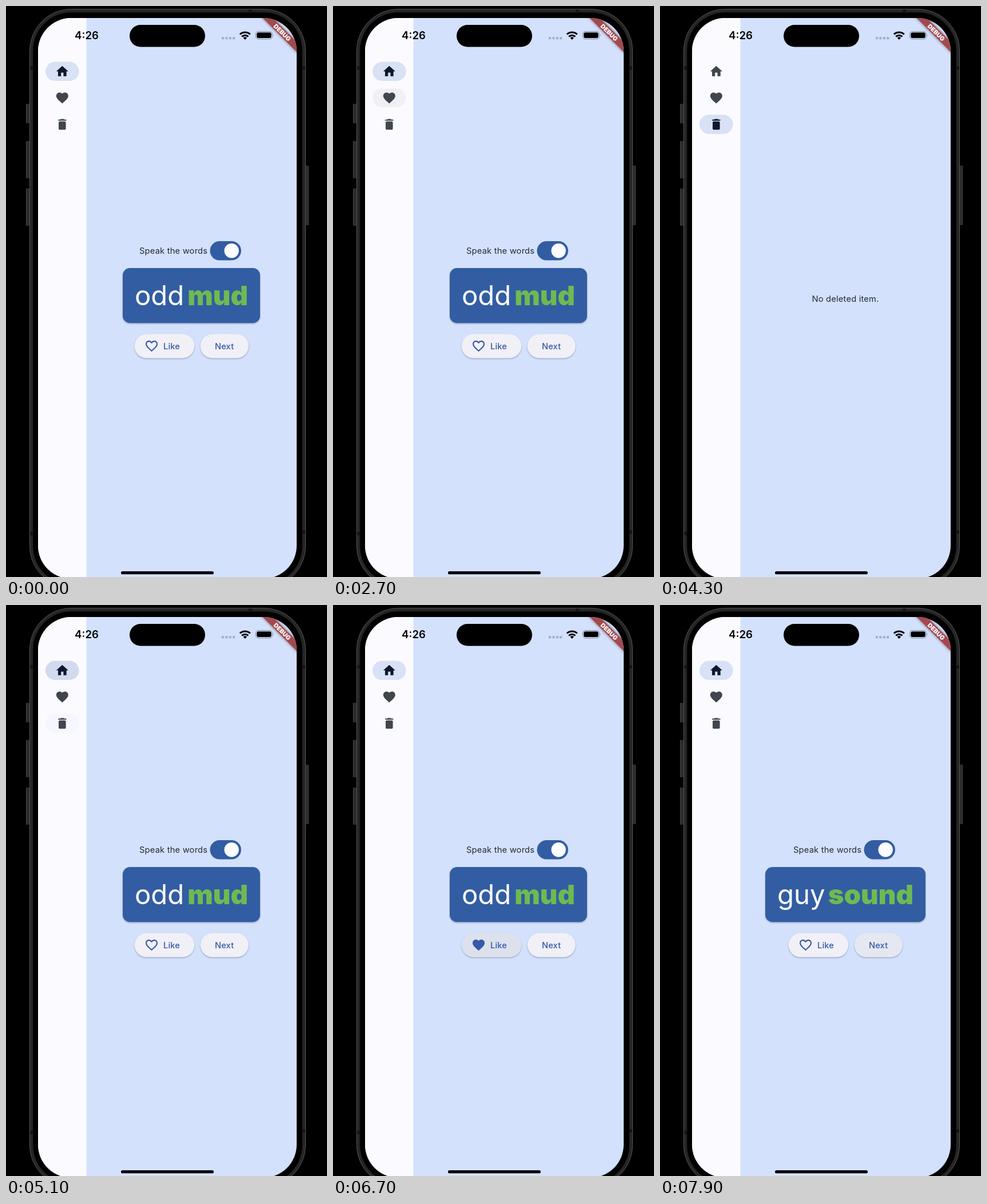
These frames come from a looping animation (561x998 px, 8 s). An HTML page:

```html
<!DOCTYPE html>
<html lang="en">
<head>
<meta charset="utf-8">
<title>Word pair app</title>
<style>
  html, body { margin: 0; height: 100%; overflow: hidden; background: #000; }
  svg { display: block; width: 100vw; height: 100vh; font-family: Inter, Roboto, sans-serif; }
  .body { font-size: 14.7px; letter-spacing: .2px; fill: #262a31; text-anchor: middle; }
  .label { font-size: 14.7px; font-weight: 500; letter-spacing: .1px; fill: #3759a8; }
  .big { font-size: 47.3px; }
  .button { fill: #f0f0f6; filter: url(#shadow); }
  .blue { fill: #325da3; }
</style>
</head>
<body>
<svg viewBox="0 0 561 998">
  <defs>
    <filter id="shadow" x="-10%" y="-20%" width="120%" height="150%">
      <feDropShadow dx="0" dy="1.3" stdDeviation="1.2" flood-color="#1b2a4a" flood-opacity=".38"/>
    </filter>
    <filter id="bannerShadow" x="-20%" y="-80%" width="140%" height="260%">
      <feDropShadow dx="0" dy="0" stdDeviation="2.6" flood-opacity=".5"/>
    </filter>
    <clipPath id="screen"><rect x="56" y="21" width="452" height="980" rx="58"/></clipPath>
    <clipPath id="wordClip"><rect id="wordArea" y="458" height="96"/></clipPath>
    <path id="home" d="M10 20v-6h4v6h5v-8h3L12 3 2 12h3v8z"/>
    <path id="heart" d="M12 21.35l-1.45-1.32C5.4 15.36 2 12.28 2 8.5 2 5.42 4.42 3 7.5 3c1.74 0 3.41.81 4.5 2.09C13.09 3.81 14.76 3 16.5 3 19.58 3 22 5.42 22 8.5c0 3.78-3.4 6.86-8.55 11.54z"/>
    <path id="heartLine" d="M16.5 3c-1.74 0-3.41.81-4.5 2.09C10.91 3.81 9.24 3 7.5 3 4.42 3 2 5.42 2 8.5c0 3.78 3.4 6.86 8.55 11.54L12 21.35l1.45-1.32C18.6 15.36 22 12.28 22 8.5 22 5.42 19.58 3 16.5 3zm-4.4 15.55l-.1.1-.1-.1C7.14 14.24 4 11.39 4 8.5 4 6.5 5.5 5 7.5 5c1.54 0 3.04.99 3.57 2.36h1.87C13.46 5.99 14.96 5 16.5 5c2 0 3.5 1.5 3.5 3.5 0 2.89-3.14 5.74-7.9 10.05z"/>
    <path id="trash" d="M6 19c0 1.1.9 2 2 2h8c1.1 0 2-.9 2-2V9c0-1.1-.9-2-2-2H8c-1.1 0-2 .9-2 2zM18 4h-2.5l-.7-.7q-.3-.3-.7-.3H9.9q-.4 0-.7.3L8.5 4H6a1 1 0 0 0 0 2h12a1 1 0 0 0 0-2z"/>
  </defs>

  <!-- Phone body -->
  <rect width="561" height="998"/>
  <path fill="#2b2b2b" d="M35 171h7v34h-7zM35 236h7v65h-7zM35 319h7v65h-7zM523 279h6v104h-6z"/>
  <path stroke="#454545" d="M35.5 171v34M35.5 236v65M35.5 319v65M528.5 279v104"/>
  <rect x="41.5" y="5.5" width="482" height="1011" rx="73" fill="#262626" stroke="#555"/>
  <rect x="47" y="11" width="471" height="1000" rx="67" stroke="#191919"/>
  <path fill="#141414" d="M42 105h5v6h-5zM518 105h5v6h-5zM42 919h5v6h-5zM518 916h5v6h-5zM424 6h6v4h-6z"/>

  <g clip-path="url(#screen)">
    <rect x="56" y="21" width="452" height="980" fill="#d3e1fc"/>
    <rect x="56" y="21" width="84.5" height="980" fill="#fbfbff"/>
    <g id="rail"></g>

    <g id="page0">
      <text class="body" x="292.6" y="433.3">Speak the words</text>
      <rect class="blue" x="356.5" y="411" width="54.5" height="33.6" rx="16.8"/>
      <circle cx="394.2" cy="427.8" r="12.7" fill="#fdfcff"/>
      <rect id="card" class="blue" y="458" height="96" rx="12.6" filter="url(#shadow)"/>
      <g clip-path="url(#wordClip)">
        <text id="first" class="big" y="522.8" fill="#fff"></text>
        <text id="second" class="big" y="522.8" font-weight="900" fill="#6fba50" text-anchor="end"></text>
      </g>
      <rect class="button" x="224.7" y="573.3" width="104.6" height="42" rx="21"/>
      <rect class="button" x="339.8" y="573.3" width="84" height="42" rx="21"/>
      <g id="buttonInk"></g>
      <use id="likeIcon" fill="#3759a8" transform="translate(241.9 581.7) scale(1.051)"/>
      <text class="label" x="275" y="599.6">Like</text>
      <text class="label" x="365" y="599.6">Next</text>
    </g>
    <text id="page1" class="body" x="324" y="516.5">No favorites yet.</text>
    <text id="page2" class="body" x="324" y="516.5">No deleted item.</text>

    <!-- Status bar -->
    <rect x="216" y="33" width="132" height="38.5" rx="19.2"/>
    <text x="141" y="58.2" font-size="18.6" font-weight="600" text-anchor="middle">4:26</text>
    <path stroke="#a5aebf" stroke-width="4" stroke-dasharray="4 2.4" d="M377 56.3h23.4"/>
    <g fill="none" stroke="#000" stroke-width="3">
      <path d="M408.8 49.5a13 13 0 0 1 18 0M412.2 53.5a8 8 0 0 1 11.2 0"/>
      <path fill="#000" stroke="none" d="M417.8 59l-3.3-3.4a4.8 4.8 0 0 1 6.6 0z"/>
    </g>
    <rect x="436.5" y="44.5" width="29" height="13.4" rx="4.4" fill="none" stroke="#7e8798"/>
    <rect x="438.3" y="46.3" width="25.4" height="9.8" rx="2.8"/>
    <path fill="#7e8798" d="M467 48.8q1.8 2.4 0 4.8z"/>

    <g transform="translate(508 21) rotate(45)">
      <rect x="-45" y="29.4" width="90" height="12.7" fill="#a34a50" filter="url(#bannerShadow)"/>
      <text y="39.7" font-size="10.7" font-weight="900" fill="#fff" text-anchor="middle">DEBUG</text>
    </g>
    <rect x="201" y="988" width="162" height="5.3" rx="2.6"/>
  </g>
</svg>

<script>
const LOOP = 8000;
const FADE = 400;
const CENTER = 324;
const $ = id => document.getElementById(id);
const clamp = v => Math.min(1, Math.max(0, v));
const progress = (t, start, length) => clamp((t - start) / length);

function add(parent, tag, attributes) {
  const node = document.createElementNS('http://www.w3.org/2000/svg', tag);
  set(node, attributes);
  return parent.appendChild(node);
}
function set(node, attributes) {
  for (const key in attributes) node.setAttribute(key, attributes[key]);
}

// A highlight with a growing ripple, clipped to a pill
function makeInk(parent, id, x, y, width, height, color) {
  const shape = { x, y, width, height, rx: height / 2 };
  add(add(parent, 'clipPath', { id }), 'rect', shape);
  const group = add(parent, 'g', { 'clip-path': `url(#${id})`, fill: color });
  return {
    group,
    fill: add(group, 'rect', { ...shape, opacity: .6 }),
    ripple: add(group, 'circle', { cx: x + width / 2, cy: y + height / 2, opacity: .4 })
  };
}

const railItems = ['home', 'heart', 'trash'].map((name, i) => {
  const y = 97.5 + i * 46.3;
  const pill = add($('rail'), 'rect', { x: -29.3, y, width: 58.6, height: 33.6, rx: 16.8, fill: '#d8e1f6' });
  const ink = makeInk($('rail'), name + 'Ink', 69, y, 58.6, 33.6, '#1a1c22');
  const icon = add($('rail'), 'use', { href: '#' + name, transform: `translate(85.7 ${y + 4.2}) scale(1.051)` });
  return { pill, ink, icon };
});
const likeInk = makeInk($('buttonInk'), 'likeInk', 224.7, 573.3, 104.6, 42, '#325da3');
const nextInk = makeInk($('buttonInk'), 'nextInk', 339.8, 573.3, 84, 42, '#325da3');

const taps = [
  { ink: railItems[1].ink, down: 2650, up: 2800, strength: .07, page: 1 },
  { ink: railItems[2].ink, down: 3660, up: 3900, strength: .07, page: 2 },
  { ink: railItems[0].ink, down: 4760, up: 4900, strength: .07, page: 0 },
  { ink: likeInk, down: 6270, up: 6650, strength: .15 },
  { ink: nextInk, down: 7370, up: 7640, strength: .17 }
];
const [, , , likeTap, nextTap] = taps;

function drawTap(tap, t) {
  const { ink, down, up, strength } = tap;
  const age = Math.max(0, t - down);
  set(ink.group, { opacity: strength * progress(t, down, 50) * (1 - progress(t, up, FADE)) });
  set(ink.ripple, { r: 10 + age * .1 + Math.max(0, t - up) * .2 });
}

function drawNavigation(t) {
  let current = 0, previous = 0, since = -LOOP;
  for (const tap of taps) {
    if (tap.page === undefined || t < tap.up) continue;
    previous = current;
    current = tap.page;
    since = tap.up;
  }
  const p = progress(t, since, 200);
  railItems.forEach(({ pill, icon }, i) => {
    const selected = i === current;
    const scale = selected ? .4 + .6 * (1 - (1 - p) ** 3) : 1;
    const leaving = i === previous ? 1 - progress(t, since, 250) : 0;
    set(pill, {
      transform: `translate(98.3 0) scale(${scale} 1)`,
      opacity: selected ? clamp(p * 2) : leaving
    });
    set(icon, { fill: selected ? '#0d1730' : '#41454d' });
    set($('page' + i), { opacity: selected ? p : i === previous ? 1 - p : 0 });
  });
}

function drawWords(t) {
  const changed = t >= nextTap.up;
  const half = 120 + 20 * progress(t, nextTap.up, 200);
  const textHalf = (changed ? 140 : 120) - 21;
  set($('card'), { x: CENTER - half, width: half * 2 });
  set($('wordArea'), { x: CENTER - half + 20, width: half * 2 - 40 });
  set($('first'), { x: CENTER - textHalf });
  set($('second'), { x: CENTER + textHalf });
  $('first').textContent = changed ? 'guy' : 'odd';
  $('second').textContent = changed ? 'sound' : 'mud';
  set($('likeIcon'), { href: t >= likeTap.up && !changed ? '#heart' : '#heartLine' });
}

const start = performance.now();
function frame() {
  const t = (performance.now() - start) % LOOP;
  taps.forEach(tap => drawTap(tap, t));
  drawNavigation(t);
  drawWords(t);
  requestAnimationFrame(frame);
}
frame();
</script>
</body>
</html>
```
